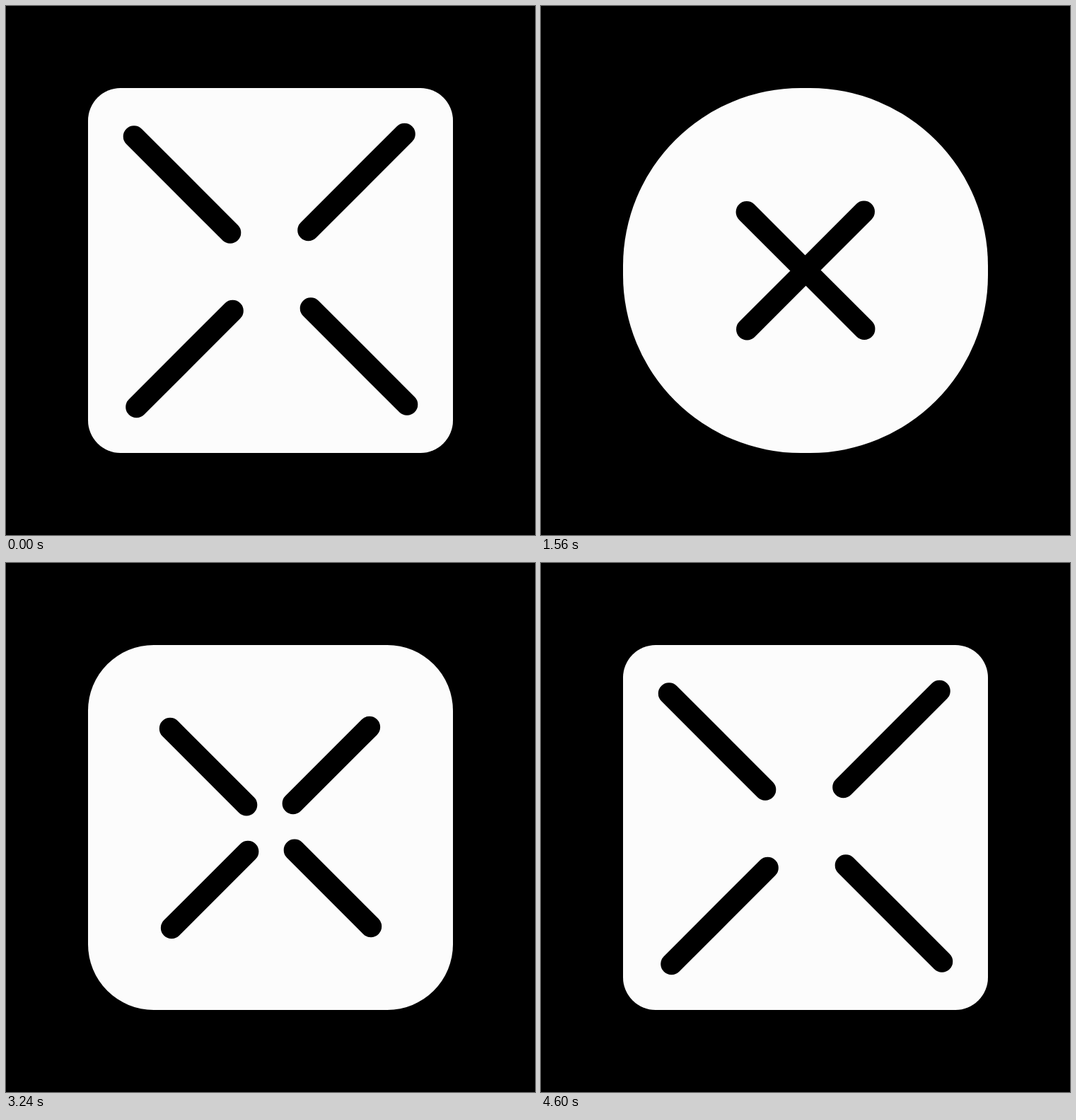
Animation of 748 by 748 pixels, one loop 5 s. Source, as an HTML page:

```html
<!DOCTYPE html>
<html>
<head>
<meta charset="utf-8">
<style>
  html, body { margin: 0; height: 100%; overflow: hidden; background: #000; }
  svg { display: block; width: 100%; height: 100%; }
</style>
</head>
<body>
<svg viewBox="-374 -374 748 748">
  <rect id="tile" x="-258" y="-258" width="516" height="516" fill="#fcfcfc"/>
  <g stroke="#000" stroke-width="30.6" stroke-linecap="round">
    <line/>
    <line transform="rotate(90)"/>
    <line transform="rotate(180)"/>
    <line transform="rotate(270)"/>
  </g>
</svg>
<script>
const LOOP = 5000, CYCLE = 2500, STEP = 40;
const tile = document.getElementById('tile');
const bars = document.querySelectorAll('line');

const mix = (a, b, p) => a + (b - a) * p;

// Cubic bezier easing with control points (x1, 0) and (x2, 1)
function ease(u, x1, x2) {
  if (u <= 0) return 0;
  if (u >= 1) return 1;
  let lo = 0, hi = 1;
  for (let i = 0; i < 30; i++) {
    const s = (lo + hi) / 2, r = 1 - s;
    const x = 3 * r * r * s * x1 + 3 * r * s * s * x2 + s * s * s;
    if (x < u) lo = s; else hi = s;
  }
  return lo * lo * (3 - 2 * lo);
}

// A leg is [start, end, x1, x2]
const leg = (t, [start, end, x1, x2]) => ease((t - start) / (end - start), x1, x2);
const there = (t, go, back) => leg(t, go) - leg(t, back);

function draw(t) {
  const cross = there(t, [345, 1250, .85, 0], [1250, 2125, .79, .175]);
  const round = there(t, [352, 1227, .9, .2], [1250, 2125, .69, .19]);

  tile.setAttribute('rx', Math.min(258, mix(46, 300, round)));

  const outer = mix(191.25, 66.5, cross);
  const inner = mix(55.25, 0, cross);
  const skew = mix(1.75, 0, cross);
  const ends = { x1: -outer - skew, y1: skew - outer, x2: -inner - skew, y2: skew - inner };
  for (const bar of bars)
    for (const key in ends) bar.setAttribute(key, ends[key]);
}

const began = performance.now();
function tick() {
  const t = (performance.now() - began) % LOOP;
  draw(Math.floor(t / STEP) * STEP % CYCLE);
  requestAnimationFrame(tick);
}
tick();
</script>
</body>
</html>
```
